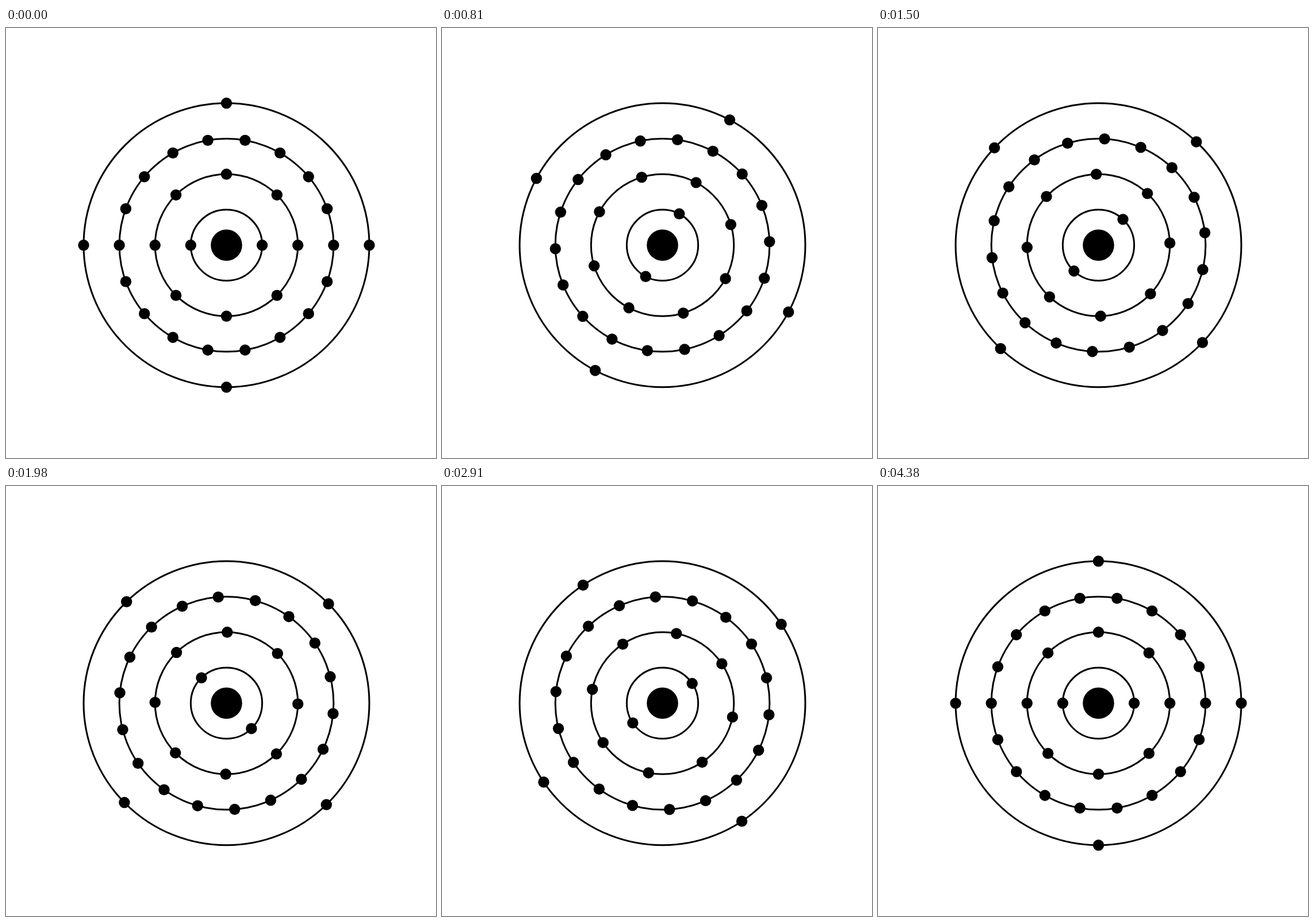
An HTML page with a canvas that plays this animation: 748 by 748 pixels, repeating every 4.51 s.

```html
<!DOCTYPE html>
<html lang="en">
<head>
<meta charset="utf-8">
<title>Spinning electron shells</title>
<style>
  html, body { margin: 0; width: 100%; height: 100%; overflow: hidden; background: #fff; }
  canvas { display: block; width: 748px; height: 748px; }
</style>
</head>
<body>
<canvas id="stage" width="748" height="748"></canvas>
<script>
  const ctx = document.getElementById('stage').getContext('2d');

  const SIZE = 748;
  const CENTER = { x: 383.5, y: 377.8 };
  const RING_GAP = { x: 62.12, y: 61.75 };
  const ELECTRONS = [2, 8, 18, 4];
  const ELECTRON_RADIUS = 9.7;
  const NUCLEUS_RADIUS = 27.3;

  const LOOP_MS = 4510;
  const STEP_MS = 30;
  const LAST_STEP = 146;
  const SPIN_STEPS = 150;
  const SPIN = Math.PI * 4;
  const SPEED_UP = 0.03;

  // Cubic ease with a very short speed-up and a long slow-down.
  function ease(x) {
    return x < SPEED_UP
      ? x ** 3 / SPEED_UP ** 2
      : 1 - (1 - x) ** 3 / (1 - SPEED_UP) ** 2;
  }

  function disc(x, y, radius) {
    ctx.beginPath();
    ctx.arc(x, y, radius, 0, Math.PI * 2);
    ctx.fill();
  }

  function drawShell(count, index, angle) {
    const rx = RING_GAP.x * (index + 1);
    const ry = RING_GAP.y * (index + 1);
    ctx.beginPath();
    ctx.ellipse(CENTER.x, CENTER.y, rx, ry, 0, 0, Math.PI * 2);
    ctx.stroke();
    for (let i = 0; i < count; i++) {
      const a = angle + i * Math.PI * 2 / count;
      disc(CENTER.x + rx * Math.cos(a), CENTER.y + ry * Math.sin(a), ELECTRON_RADIUS);
    }
  }

  function draw(time) {
    const step = Math.min(Math.floor(time % LOOP_MS / STEP_MS), LAST_STEP);
    const angle = SPIN * ease(step / SPIN_STEPS);
    ctx.fillStyle = '#fff';
    ctx.fillRect(0, 0, SIZE, SIZE);
    ctx.fillStyle = ctx.strokeStyle = '#000';
    ctx.lineWidth = 3;
    ELECTRONS.forEach((count, index) => drawShell(count, index, angle));
    disc(CENTER.x, CENTER.y, NUCLEUS_RADIUS);
  }

  const start = performance.now();
  function tick() {
    draw(performance.now() - start);
    requestAnimationFrame(tick);
  }
  tick();
</script>
</body>
</html>
```
